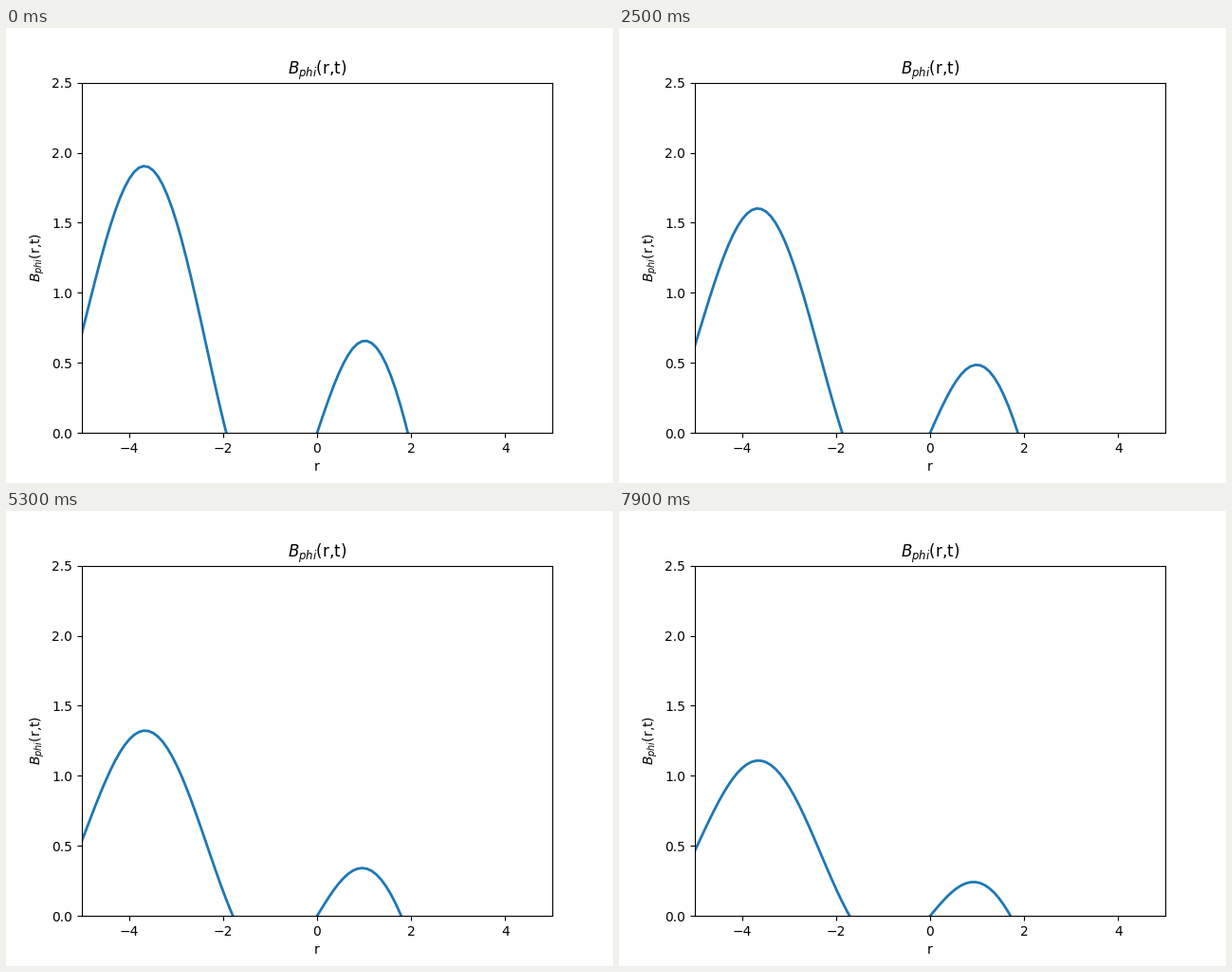
A matplotlib script that plays this animation: 640 by 480 pixels, repeating every 8 s.

```python
import numpy as np
import matplotlib.pyplot as plt
from matplotlib.animation import FuncAnimation

FRAMES = 80
INTERVAL = 100          # ms
ETA = 0.002             # diffusion per step
KZ2 = (np.pi / 2) ** 2  # axial part of the decay
MODES = [(2.2256, 1.4197), (-2.012, 0.577)]  # amplitude, radial wavenumber


def bessel_j1(x):
    theta = (np.arange(200) + 0.5) * np.pi / 200
    return np.cos(theta - np.outer(x, np.sin(theta))).mean(axis=1)


r = np.linspace(-5, 5, 100)
shapes = [(amp * bessel_j1(k * r), ETA * (k**2 + KZ2)) for amp, k in MODES]


def field(step):
    return sum(shape * np.exp(-rate * step) for shape, rate in shapes)


fig, ax = plt.subplots(figsize=(6.4, 4.8), dpi=100)
ax.set(xlim=(-5, 5), ylim=(0, 2.5), xlabel="r",
       ylabel="$B_{phi}$(r,t)", title="$B_{phi}$(r,t)")
line, = ax.plot(r, field(0), lw=2)


def update(step):
    line.set_ydata(field(step))
    return line,


anim = FuncAnimation(fig, update, frames=FRAMES, interval=INTERVAL,
                     repeat=True, repeat_delay=0)
plt.show()
```
